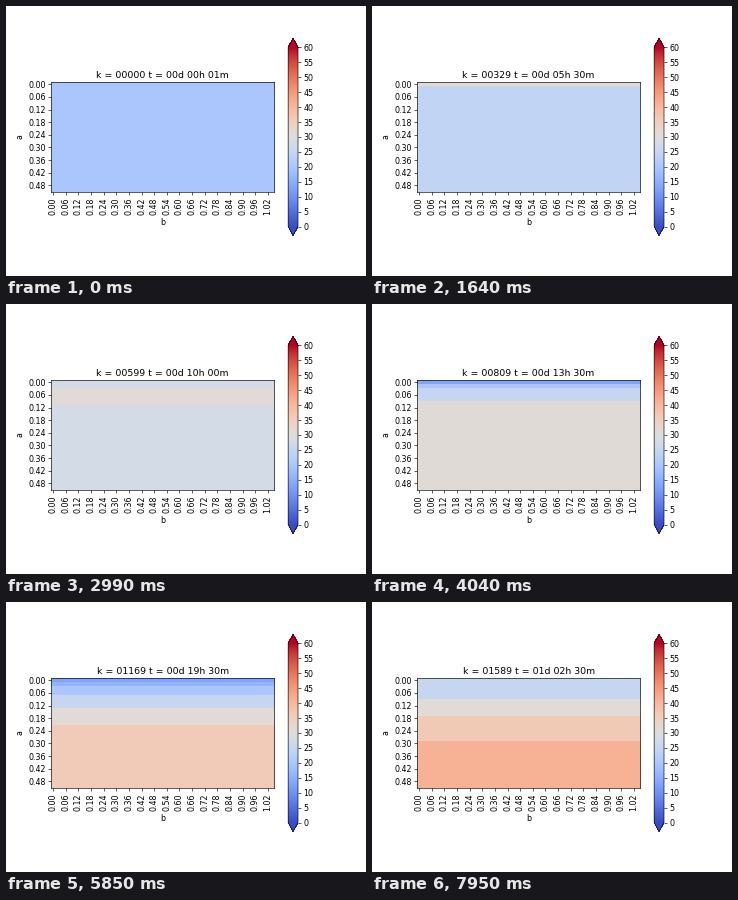
Recreate the animation shown at these times as a matplotlib script. Size 360 by 270 pixels, loop 8 s.

```python
import matplotlib.pyplot as plt
import numpy as np
from matplotlib.animation import FuncAnimation

ROWS, COLS, CELL = 26, 53, 0.02
LOOP_MS, INTERVAL, STEP_MS = 8000, 40, 150
STEP_MINUTES = 30
STEPS = LOOP_MS // STEP_MS + 1
HEATING = 0.8          # degrees per hour, everywhere
DIFFUSIVITY = 0.0013   # square metres per hour

SURFACE_HOURS = [0, 4.6, 5.5, 7.5, 10, 13.5, 16.5, 19.5, 23.5, 26.5]
SURFACE_TEMPS = [20, 23.7, 30.3, 31.5, 28, 14.5, 10.5, 12, 19, 25]
BANDS = np.array([10, 13, 16, 20, 25.5, 31, 36, 39.5])


def simulate():
    """Temperature by depth at each displayed step, solved minute by minute."""
    temps = np.full(ROWS, 20.0)
    rate = DIFFUSIVITY / CELL**2 / 60
    history = [temps.copy()]
    for minute in range(1, (STEPS - 1) * STEP_MINUTES + 1):
        padded = np.append(temps, temps[-1])
        temps[1:] += rate * np.diff(padded, 2) + HEATING / 60
        temps[0] = np.interp(minute / 60, SURFACE_HOURS, SURFACE_TEMPS)
        if minute % STEP_MINUTES == 0:
            history.append(temps.copy())
    return history


def banded(temps):
    """Snap a profile to flat bands, keeping the deep temperature exact."""
    deep = temps[-1]
    levels = np.append(BANDS[abs(BANDS - deep) > 1.5], deep)
    nearest = abs(temps[:, None] - levels).argmin(axis=1)
    return np.repeat(levels[nearest][:, None], COLS, axis=1)


fields = [banded(temps) for temps in simulate()]

fig, ax = plt.subplots(figsize=(6.4, 4.8), dpi=56.25)
fig.subplots_adjust(bottom=0.15)
image = ax.imshow(fields[0], cmap="coolwarm", vmin=0, vmax=60,
                  interpolation="nearest")
fig.colorbar(image, ax=ax, extend="both", ticks=range(0, 61, 5))

x_ticks, y_ticks = range(0, COLS, 3), range(0, ROWS, 3)
ax.set_xticks(x_ticks, [f"{i * CELL:.2f}" for i in x_ticks], rotation=90)
ax.set_yticks(y_ticks, [f"{i * CELL:.2f}" for i in y_ticks])
ax.set_xlabel("b")
ax.set_ylabel("a")
title = ax.set_title("")


def update(frame):
    step = min((frame + 1) * INTERVAL // STEP_MS, STEPS - 1)
    minutes = max(1, step * STEP_MINUTES)
    days, rest = divmod(minutes, 1440)
    hours, mins = divmod(rest, 60)
    title.set_text(f"k = {minutes - 1:05d} t = {days:02d}d {hours:02d}h {mins:02d}m")
    image.set_data(fields[step])
    return image, title


anim = FuncAnimation(fig, update, frames=LOOP_MS // INTERVAL,
                     interval=INTERVAL, repeat=True, repeat_delay=0)
plt.show()
```
